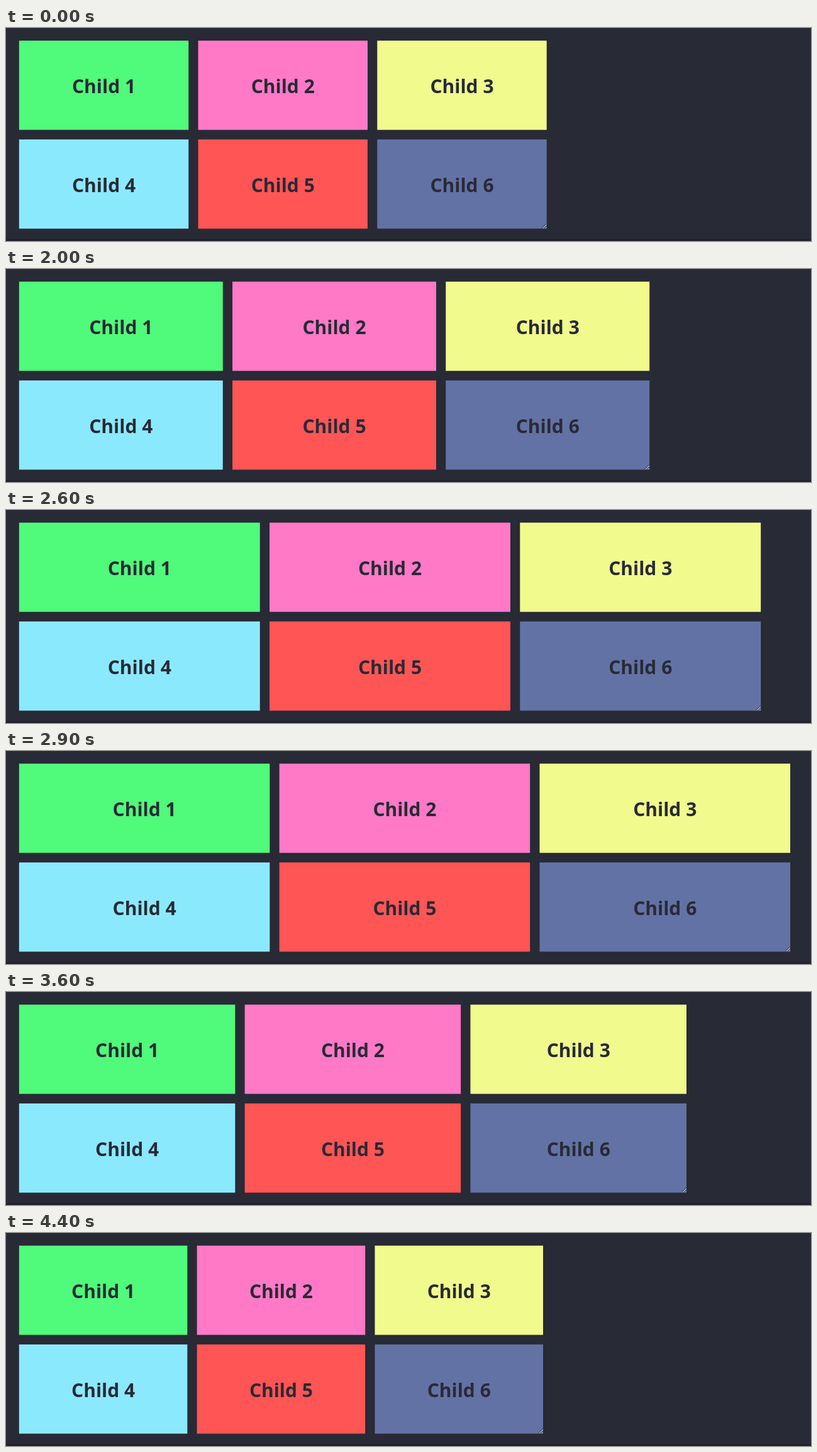
These frames come from a looping animation (1280x340 px, 5.6 s). An HTML page with a canvas:

```html
<!DOCTYPE html>
<html lang="en">
<head>
<meta charset="utf-8">
<title>Resizable grid</title>
<style>
  html, body { margin: 0; width: 100%; height: 100%; overflow: hidden; background: #282a36; }
  canvas { display: block; }
</style>
</head>
<body>
<canvas id="stage" width="1280" height="340"></canvas>
<script>
const ctx = document.getElementById('stage').getContext('2d');
const LOOP = 5600, STEP = 100;
const LEFT = 20.8, TOP = 20.2, GAP = 15.3, CELL_H = 142.4;
const DARK = '#282a36';
const COLORS = ['#50fa7b', '#ff79c6', '#f1fa8c', '#8be9fd', '#ff5555', '#6272a4'];

// Right edge of the grid while it is dragged: [step, x]
const DRAG = [
  [15, 859.7], [16, 872.4], [20, 1023.2], [21, 1067], [26, 1200.2], [27, 1225],
  [29, 1247], [30, 1247], [33, 1202], [36, 1082], [40, 934], [42, 881], [44, 854]
];

const slope = (a, b) => (b[1] - a[1]) / (b[0] - a[0]);

function tangent(i) {
  if (i === 0 || i === DRAG.length - 1) return 0;
  return (slope(DRAG[i - 1], DRAG[i]) + slope(DRAG[i], DRAG[i + 1])) / 2;
}

// Cubic Hermite curve through the drag points
function rightEdge(step) {
  const last = DRAG.length - 1;
  if (step <= DRAG[0][0]) return DRAG[0][1];
  if (step >= DRAG[last][0]) return DRAG[last][1];
  let i = 0;
  while (step >= DRAG[i + 1][0]) i++;
  const [s0, x0] = DRAG[i], [s1, x1] = DRAG[i + 1];
  const h = s1 - s0, u = (step - s0) / h, v = 1 - u;
  return x0 * (1 + 2 * u) * v * v + x1 * u * u * (3 - 2 * u)
    + h * u * v * (tangent(i) * v - tangent(i + 1) * u);
}

function drawCell(i, width) {
  const x = LEFT + (i % 3) * (width + GAP);
  const y = TOP + Math.floor(i / 3) * (CELL_H + GAP);
  ctx.fillStyle = COLORS[i];
  ctx.fillRect(x, y, width, CELL_H);
  ctx.fillStyle = DARK;
  ctx.fillText('Child ' + (i + 1), x + width / 2, y + 84.2);
}

function diagonal(x, y, size, color) {
  ctx.strokeStyle = color;
  ctx.beginPath();
  ctx.moveTo(x - size, y);
  ctx.lineTo(x, y - size);
  ctx.stroke();
}

function drawHandle(x, y) {
  for (const size of [7, 3]) {
    diagonal(x, y, size, '#22242e');
    diagonal(x, y, size - 1.4, '#e4e6ee');
  }
}

function draw(time) {
  const right = rightEdge(Math.floor(time / STEP));
  const width = (right - LEFT - 2 * GAP) / 3;
  ctx.fillStyle = DARK;
  ctx.fillRect(0, 0, 1280, 340);
  ctx.fillStyle = '#241f2c';
  ctx.fillRect(0, 337, 1280, 3);
  ctx.font = 'bold 30px "Open Sans", "Noto Sans", sans-serif';
  ctx.textAlign = 'center';
  ctx.lineWidth = 1;
  COLORS.forEach((_, i) => drawCell(i, width));
  drawHandle(right - 0.5, TOP + 2 * CELL_H + GAP - 0.8);
}

const start = performance.now();
function tick() {
  draw((performance.now() - start) % LOOP);
  requestAnimationFrame(tick);
}
tick();
</script>
</body>
</html>
```
